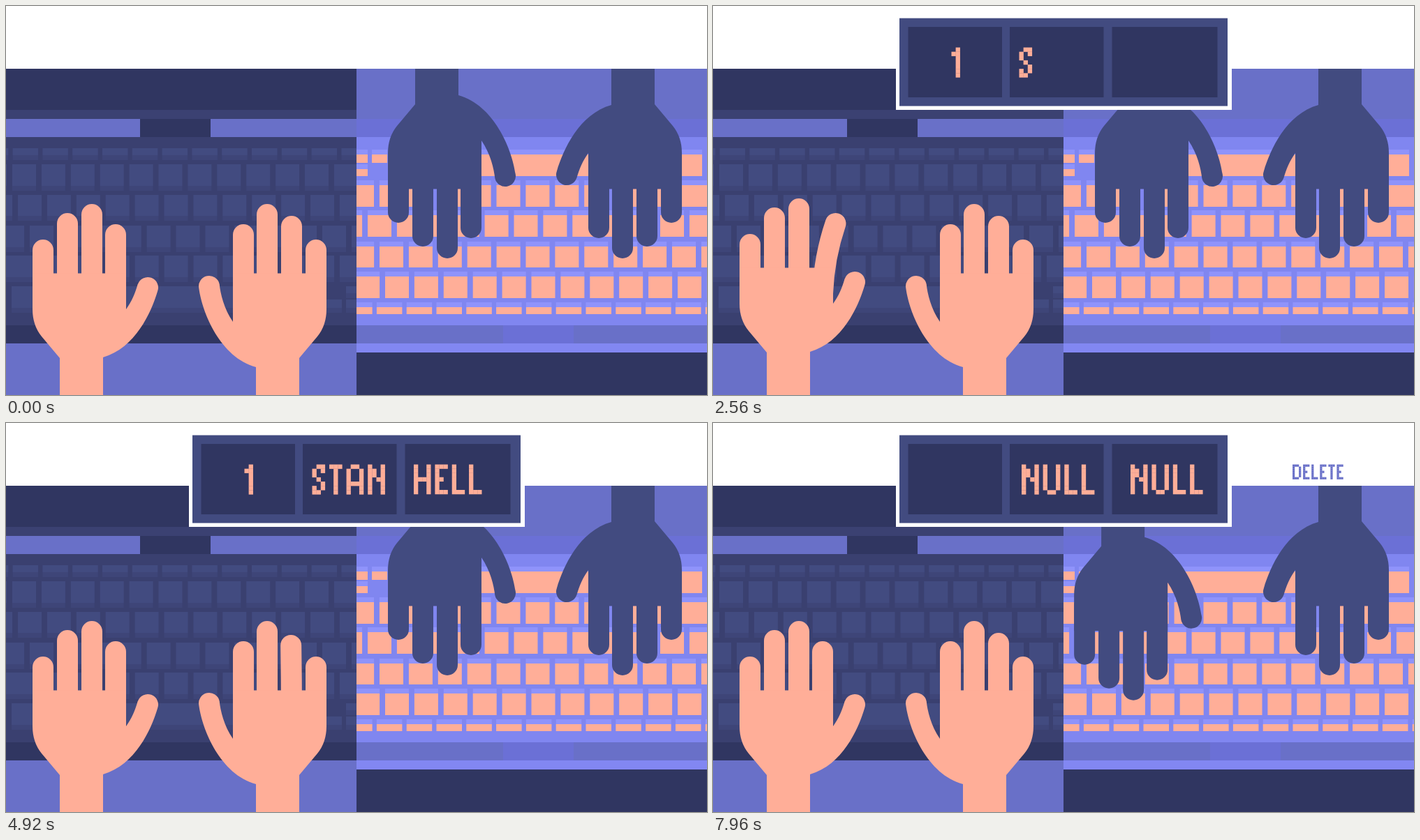
Recreate the animation shown at these times as an HTML page with a canvas. Size 1004 by 558 pixels, loop 8 s.

```html
<!DOCTYPE html>
<html>
<head>
<meta charset="utf-8">
<style>
html, body { margin: 0; width: 100%; height: 100%; overflow: hidden; background: #fff; }
canvas { display: block; }
</style>
</head>
<body>
<canvas id="stage" width="1004" height="558"></canvas>
<script>
const ctx = document.getElementById('stage').getContext('2d');
const LOOP = 8000;
const NAVY = '#303661', SLATE = '#424b80', PEACH = '#ffae98', VIOLET = '#6970c8';

const DARK = { edge: '#3b4172', hinge: NAVY, base: '#3a4070', foot: NAVY, key: SLATE, skirt: '#3e4578' };
const LIGHT = { edge: '#8287f2', hinge: '#6b70d6', base: '#8086f0', foot: '#6b70d6', key: PEACH, skirt: '#8f93fb' };

const GLYPHS = {
  1: '.x xx .x .x .x .x .x',
  S: '.xx x.x x.. .x. ..x x.x xx.',
  T: 'xxx .x. .x. .x. .x. .x. .x.',
  A: '.xx. x..x x..x x..x xxxx x..x x..x',
  N: 'x..x xx.x xx.x x.xx x..x x..x x..x',
  H: 'x..x x..x x..x xxxx x..x x..x x..x',
  E: 'xxx x.. x.. xx. x.. x.. xxx',
  L: 'x.. x.. x.. x.. x.. x.. xxx',
  O: '.xx. x..x x..x x..x x..x x..x .xx.',
  U: 'x..x x..x x..x x..x x..x x..x .xx.',
  D: 'xxx. x..x x..x x..x x..x x..x xxx.'
};

// Key presses. Fingers count from the little finger; negative x points outward.
const press = (side, finger, start, peak, end, hand, bend, hold = 0) =>
  ({ side, finger, start, peak, end, hand, bend, hold });
const enter = (start, peak, end, hold) => press('R', 0, start, peak, end, [-45, -18], [-15, -4], hold);
const PRESSES = [
  press('L', 0, 1180, 1480, 1740, [0, -30], [-17, -8]),
  enter(1640, 1880, 2220, 80),
  press('L', 1, 1720, 2000, 2280, [0, -19], [-1, 0]),
  press('L', 3, 2360, 2640, 2840, [0, -9.5], [22, -9.5]),
  press('L', 0, 2640, 2800, 3000, [0, 0], [0, 6]),
  press('R', 3, 2840, 3040, 3240, [6, 8], [4, 10]),
  enter(3240, 3480, 3800, 80),
  press('R', 3, 3760, 3960, 4160, [0, -6], [20, -2]),
  press('L', 2, 4080, 4320, 4600, [0, 0], [-19, -8]),
  press('R', 1, 4280, 4480, 4640, [0, 0], [4, 14]),
  press('R', 1, 4680, 4840, 4960, [0, 0], [4, 14]),
  press('R', 1, 4960, 5180, 5340, [0, -16], [2, -4]),
  enter(5320, 5500, 5740, 20)
];
const NAME_TIMES = [2040, 2640, 2800, 3040];
const WORD_TIMES = [3960, 4320, 4480, 4840, 5180];

const clamp = p => Math.min(1, Math.max(0, p));
const ease = p => p < .5 ? 2 * p * p : 1 - 2 * (1 - p) ** 2;
const pulse = (t, start, peak, end, hold = 0) => t < peak
  ? ease(clamp((t - start) / (peak - start)))
  : 1 - ease(clamp((t - peak - hold) / (end - peak - hold)));

function rect(color, x, y, w, h) {
  ctx.fillStyle = color;
  ctx.fillRect(x, y, w, h);
}

function text(str, x, y, size, color) {
  for (const ch of str) {
    const rows = GLYPHS[ch].split(' ');
    rows.forEach((row, j) => [...row].forEach((dot, i) => {
      if (dot === 'x') rect(color, x + i * size, y + j * size, size + .2, size + .2);
    }));
    x += (rows[0].length + 1) * size;
  }
}

function key(c, x, y, w, h) {
  rect(c.skirt, x, y + h, w, 7);
  rect(c.key, x, y, w, h);
}

function board(c) {
  rect(NAVY, 0, 85, 505, 64);
  rect(c.edge, 0, 149, 505, 13);
  rect(VIOLET, 0, 162, 505, 26);
  rect(c.hinge, 192, 162, 101, 26);
  rect(c.base, 0, 188, 505, 270);
  rect(c.foot, 0, 458, 505, 26);
  rect(VIOLET, 0, 484, 505, 75);
  for (let i = -1; i < 12; i++) {
    key(c, 9.6 + 42.8 * i, 204, 36.5, 10);
    key(c, 9 + 41.9 * i, 227, 34, 31);
    key(c, 17 + 41.9 * i, 271, 34, 30);
    key(c, 34 + 41.9 * i, 315, 34, 31);
    if (i >= 0) key(c, 59 + 41.9 * i, 358, 34, 31);
  }
  key(c, 0, 358, 51, 31);
  for (let i = 0; i < 3; i++) key(c, 8 + 42 * i, 402, 34, 31);
  key(c, 134, 402, 268, 31);
  key(c, 487, 402, 18, 10);
  key(c, 487, 421, 18, 12);
  key(c, 459, 421, 22, 12);
}

function pose(side, t) {
  const p = { x: 0, y: 0, bends: [[0, 0], [0, 0], [0, 0], [0, 0]] };
  for (const k of PRESSES) {
    if (k.side !== side) continue;
    const a = pulse(t, k.start, k.peak, k.end, k.hold);
    p.x += k.hand[0] * a;
    p.y += k.hand[1] * a;
    p.bends[k.finger][0] += k.bend[0] * a;
    p.bends[k.finger][1] += k.bend[1] * a;
  }
  return p;
}

// Both hands share one shape, mirrored for the right; only the thumbs differ.
function hand(side, color, p, ringY = 316) {
  ctx.save();
  if (side === 'R') { ctx.translate(497, 0); ctx.scale(-1, 1); }
  ctx.translate(p.x, p.y);
  ctx.fillStyle = ctx.strokeStyle = color;
  ctx.lineWidth = 30;
  ctx.lineCap = 'round';
  [[53, 350], [88, ringY], [123, 299], [157, 328]].forEach(([x, y], i) => {
    const [dx, dy] = p.bends[i];
    ctx.beginPath();
    ctx.moveTo(x, 420);
    ctx.quadraticCurveTo(x + dx * .12, 368, x + dx, y + dy);
    ctx.stroke();
  });
  ctx.beginPath();
  ctx.moveTo(38, 383.5);
  ctx.lineTo(172, 383.5);
  if (side === 'L') {
    ctx.lineTo(172, 435);
    ctx.bezierCurveTo(180, 424, 185, 412, 188.7, 399);
    ctx.arc(203, 404, 15, Math.PI + .34, .33);
    ctx.bezierCurveTo(208, 440, 185, 491, 139, 504);
  } else {
    ctx.lineTo(172, 453);
    ctx.bezierCurveTo(185, 434, 190, 412, 191.3, 399);
    ctx.arc(206, 402, 15, Math.PI + .2, .2);
    ctx.bezierCurveTo(216, 440, 190, 504, 139, 518);
  }
  ctx.lineTo(139, 680);
  ctx.lineTo(77, 680);
  ctx.lineTo(77, 505);
  ctx.lineTo(51, 474);
  ctx.quadraticCurveTo(38, 458, 38, 435);
  ctx.fill();
  ctx.restore();
}

function clipped(x, w, draw) {
  ctx.save();
  ctx.beginPath();
  ctx.rect(x, 90, w, 468);
  ctx.clip();
  draw();
  ctx.restore();
}

function turned(x, y, draw) {
  ctx.save();
  ctx.translate(x, y);
  ctx.rotate(Math.PI);
  draw();
  ctx.restore();
}

function panel(t) {
  rect('#fff', 262, 17, 481, 132);
  rect(SLATE, 267, 17.5, 470, 126);
  rect(NAVY, 279.5, 30, 134.5, 101);
  rect(NAVY, 425, 30, 134.5, 101);
  rect(NAVY, 571.5, 30, 151, 101);
  const typed = (word, times) => word.slice(0, times.filter(k => t >= k).length);
  const erased = t >= 6880;
  if (t >= 1480 && t < 7840) text('1', 341.5, 59.5, 6.13, PEACH);
  text(erased ? 'NULL' : typed('STAN', NAME_TIMES), erased ? 442 : 438.5, 59.5, 6.13, PEACH);
  text(erased ? 'NULL' : typed('HELLO', WORD_TIMES), erased ? 598 : 584, 59.5, 6.08, PEACH);
}

function draw(t) {
  rect('#fff', 0, 0, 1004, 558);
  clipped(0, 502, () => {
    board(DARK);
    hand('L', PEACH, pose('L', t), 312);
    hand('R', PEACH, pose('R', t));
  });
  const reach = pulse(t, 6680, 6880, 7128) + pulse(t, 7640, 7840, 8088);
  const still = pose('', 0);
  clipped(502, 502, () => {
    turned(1005, 646, () => board(LIGHT));
    turned(1006, 646, () => hand('L', SLATE, still));
    turned(1006 - 57 * reach, 646 + 68 * reach, () => hand('R', SLATE, still));
  });
  if (t >= 1200) panel(t);
  if ((t >= 6880 && t < 7440) || t >= 7840) text('DELETE', 830, 59.5, 3.02, VIOLET);
}

function frame() {
  draw(performance.now() % LOOP);
  requestAnimationFrame(frame);
}
frame();
</script>
</body>
</html>
```
